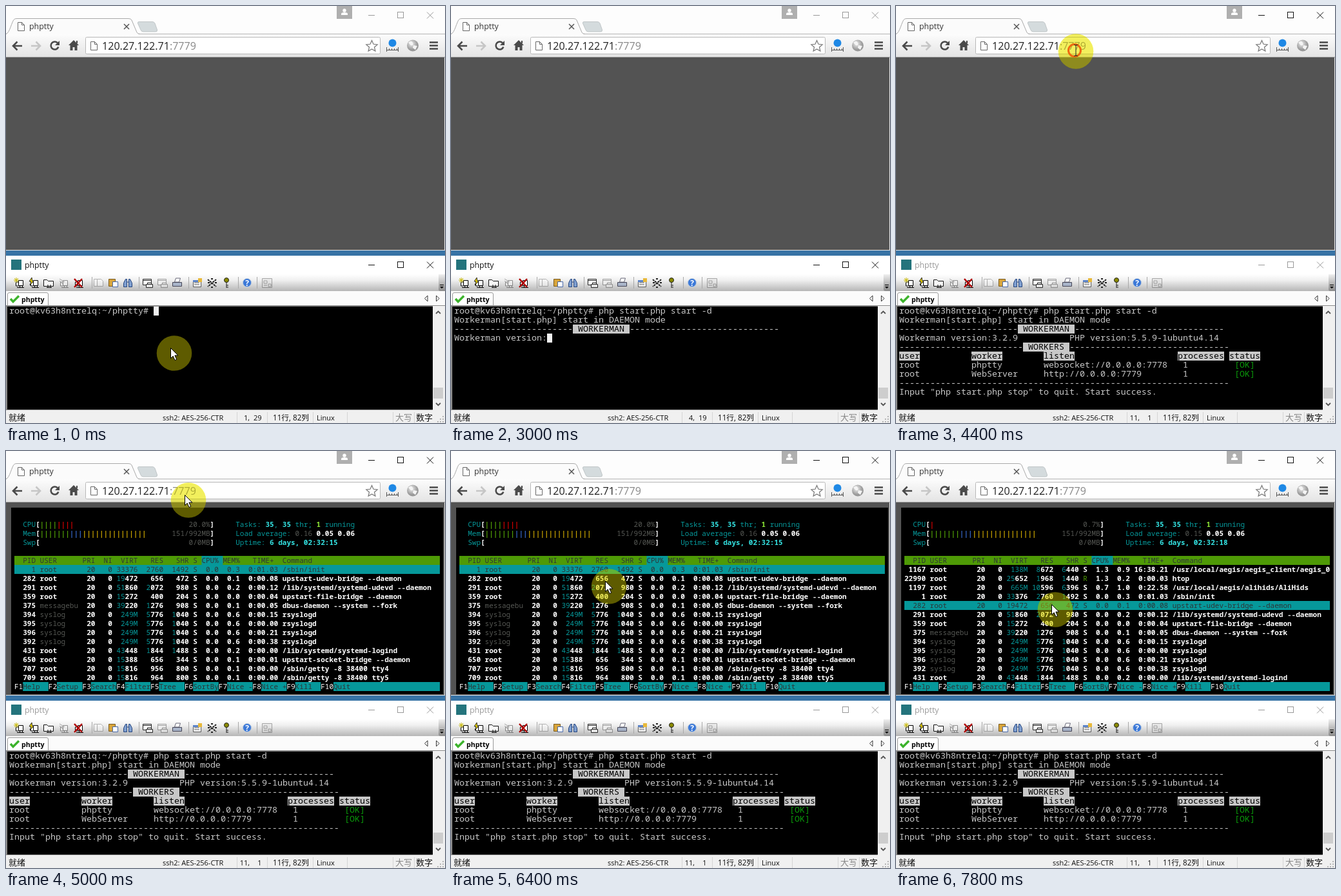
These frames come from a looping animation (681 by 648 pixels, 8 s). An HTML page:

```html
<!DOCTYPE html>
<html lang="zh">
<head>
<meta charset="utf-8">
<title>phptty</title>
<style>
html, body { margin: 0; width: 100%; height: 100%; overflow: hidden; background: #fff; }
svg { display: block; width: 681px; height: 648px; }
text { white-space: pre; font-family: "Open Sans", "Noto Sans CJK SC", "Noto Sans CJK", sans-serif; }
.mono text { font-family: "Noto Sans Mono", "DejaVu Sans Mono", monospace; }
#top text { font-size: 11px; }
#shell text { font-size: 13.333px; }
.line { fill: none; stroke: #555; }
.bar { font-size: 11px; fill: #111; }
.tint { mix-blend-mode: multiply; }
</style>
</head>
<body>
<svg viewBox="0 0 681 648" xmlns="http://www.w3.org/2000/svg">
  <defs>
    <linearGradient id="nav" x2="0" y2="1"><stop stop-color="#fcfcfc"/><stop offset="1" stop-color="#e4e4e4"/></linearGradient>
    <linearGradient id="tools" x2="0" y2="1"><stop stop-color="#fff"/><stop offset=".35" stop-color="#f0f0f0"/><stop offset="1" stop-color="#b6b6b6"/></linearGradient>
    <linearGradient id="grip" x2="0" y2="1"><stop stop-color="#eee"/><stop offset="1" stop-color="#8a8a8a"/></linearGradient>
    <radialGradient id="ball" cx=".4" cy=".35"><stop stop-color="#eee"/><stop offset="1" stop-color="#999"/></radialGradient>
    <path id="sheet" d="M.5.5h6l4 4v9h-10zM6.5.5v4h4" fill="#fff" stroke="#666"/>
    <g id="controls" fill="none" stroke="currentColor">
      <path d="M0 5.500h10M91 .5l10 10M101 .5l-10 10"/><rect x="45.500" y=".5" width="9" height="9"/>
    </g>
  </defs>

  <!-- browser window -->
  <rect width="681" height="80" fill="#fdfdfd"/>
  <rect y="44" width="681" height="35" fill="url(#nav)"/>
  <path d="M0 43.500H681" stroke="#b4b4b4"/>
  <path d="M0 44C6 42 9 23 13 20.500Q14 19.500 17 19.500H190Q194 19.500 195 22L203 41Q204 43.500 208 44Z" fill="#fbfbfb"/>
  <path d="M0 43.500C6 42 9 23 13 20.500Q14 19.500 17 19.500H190Q194 19.500 195 22L203 41Q204 43.500 208 43.500" fill="none" stroke="#aaa"/>
  <path d="M206 24.500H227Q230 24.500 231 27L234.500 37Q235 40 232 40H213Q210 40 209 37L204.500 27Q204 24.500 206 24.500Z" fill="#d4dbdd" stroke="#c0c6c8"/>
  <rect x="513" width="24" height="20" fill="#afafaf"/>
  <path d="M520 14v-2q0-2 5-2t5 2v2z" fill="#fff"/><circle cx="525" cy="7" r="2.700" fill="#fff"/>
  <use href="#sheet" x="18" y="25"/>
  <text x="36" y="36" font-size="12.400" fill="#333">phptty</text>
  <path d="M183 28l8 8M191 28l-8 8" stroke="#555" stroke-width="1.500"/>
  <g fill="none" stroke="#4a4a4a" stroke-width="2.600">
    <path d="M25 62H12M17.500 55.500L11 62l6.500 6.500"/>
    <path d="M39 62H52M46.500 55.500L53 62l-6.500 6.500" stroke="#c6c6c6"/>
    <path d="M80.500 58a6 6 0 1 0 .8 5.500"/>
    <path d="M657 56.500h13M657 61.500h13M657 66.500h13"/>
  </g>
  <path d="M83 54v7h-7z" fill="#4a4a4a"/>
  <path d="M105 53l8 8h-2.500v8h-4v-5h-3v5h-4v-8H97zM109 54h2v4h-2z" fill="#4a4a4a"/>
  <rect x="123.500" y="48.500" width="457" height="26" rx="2" fill="#fff" stroke="#b8b8b8"/>
  <use href="#sheet" x="131" y="55"/>
  <text x="149" y="68" font-size="16.100" fill="#222">120.27.122.71<tspan fill="#888">:7779</tspan></text>
  <path d="M567.500 53.500l2.500 5.800 6.200.6-4.700 4.100 1.400 6.100-5.400-3.200-5.400 3.200 1.400-6.100-4.700-4.100 6.200-.6z" fill="#fff" stroke="#777" stroke-width="1.200"/>
  <circle cx="599.500" cy="57.500" r="6" fill="#1e88e5"/>
  <path d="M590.500 64v7M608.500 64v7M590 68.500h19M594.500 66v3M598.500 66v3M602.500 66v3M606.500 66v3" class="line"/>
  <circle cx="631" cy="61.500" r="9" fill="url(#ball)"/>
  <path d="M624 57q5-5 7 0t-3 4zM632 61l6 1-3 6-4-3z" fill="#f4f4f4"/>
  <path d="M0 79.500H681" stroke="#9a9a9a"/>
  <rect y="80" width="680" height="299" fill="#535353"/>
  <rect x="680" y="80" width="1" height="299" fill="#e8e8e8"/>
  <g id="top" class="mono"></g>
  <rect y="379" width="681" height="1" fill="#e8e8e8"/>
  <rect y="380" width="681" height="8" fill="#3773a5"/>
  <use id="ctlA" href="#controls" x="562" y="9"/>

  <!-- terminal window -->
  <rect y="388" width="681" height="29" fill="#fff"/>
  <rect x="8" y="394" width="16" height="16" fill="#24747c"/>
  <text id="title" x="29" y="407" font-size="12.300">phptty</text>
  <use id="ctlB" href="#controls" x="562" y="397"/>
  <rect y="417" width="681" height="26" fill="url(#tools)"/>
  <g id="icons"></g>
  <path d="M671 417h10v26h-7q-3 0-3-3z" fill="url(#grip)"/>
  <path d="M673 433.500h6" stroke="#000"/><path d="M673 436h6l-3 3z"/>
  <rect y="443" width="681" height="23" fill="#fbfbfb"/>
  <path d="M2.500 466V448q0-2.500 2.500-2.500H63q2.500 0 2.500 2.500V466" fill="#fff" stroke="#999"/>
  <path d="M7 455l4 4.500 9-9" fill="none" stroke="#3cb32c" stroke-width="3.500"/>
  <text x="24" y="459.500" font-size="10.600" font-weight="bold">phptty</text>
  <path d="M654 450v9l-4.500-4.500zM667.500 450v9l4.500-4.500z" fill="#fff" stroke="#333"/>
  <rect y="465" width="681" height="164" fill="#8a8a8a"/>
  <rect x="2" y="467" width="660" height="160" fill="#000"/>
  <rect x="662" y="466" width="19" height="162" fill="#f0f0f0"/>
  <rect x="663" y="593" width="15" height="17" fill="#cdcdcd"/>
  <path d="M667 478l3.500-3.500 3.500 3.500M667 617l3.500 3.500 3.500-3.500" class="line" stroke-width="1.800"/>
  <g id="shell" class="mono"></g>
  <rect y="628" width="681" height="20" fill="#f0f0f0"/>
  <path d="M358.500 631v17M405.500 631v17M476.500 631v17M529.500 631v17M600.500 631v17M633.500 631v17" stroke="#d5d5d5"/>
  <g class="bar">
    <text x="4" y="644" font-size="13">就绪</text>
    <text x="243" y="644">ssh2: AES-256-CTR</text>
    <text id="row" x="378" y="644" text-anchor="end"></text>
    <text id="col" x="396.500" y="644" text-anchor="end"></text>
    <text x="414" y="644" font-size="11.700">11行, 82列</text>
    <text x="482" y="644">Linux</text>
    <text x="604" y="644" font-size="13" fill="#888">大写</text>
    <text x="636" y="644" font-size="13">数字</text>
  </g>
  <path d="M677 637h2v2h-2zM677 641h2v2h-2zM677 645h2v2h-2zM673 641h2v2h-2zM673 645h2v2h-2zM669 645h2v2h-2z" fill="#b5b5b5"/>
  <g id="mouse"></g>
</svg>
<script>
const STEP = 200, LOOP = 8000;
const $ = id => document.getElementById(id);
const rect = (x, y, w, h, fill) => `<rect x="${x}" y="${y}" width="${w}" height="${h}" fill="${fill}"/>`;
const path = (d, fill = "none", stroke = "#333") => `<path d="${d}" fill="${fill}" stroke="${stroke}"/>`;

// Character grid: returns a writer for text at (column, row)
const grid = (x0, y0, cw) => (c, r, s, fill, bg, weight = 400) => {
  const x = x0 + c * cw, y = y0 + r * 14;
  return (bg ? rect(x, y, s.length * cw, 14, bg) : "") +
    `<text x="${x}" y="${y + 11}" fill="${fill}" font-weight="${weight}">${s}</text>`;
};

/* ---- toolbar icons ---- */
const at = (x, body) => `<g transform="translate(${x} 422)">${body}</g>`;
const plug = path("M7.500 4.500h7v8h-7zM9.500 12v3M13.500 12v3M5 15.500h11M7.500 7h-4v6h4", "#fff", "#000");
const folder = path("M.5 3.500h5l2 2h8v8H.5z", "#f6f6f6", "#111") + path("M7 11v4M11 11v4M5 15.500h8", "none", "#111");
const win = path("M.5 2.500h13v9H.5zM.5 4.500h13", "#fff", "#222");
const printer = path("M7.500 11v-3h6v3M5.500 10.500h10v5h-10z", "#e8e8e8", "#222");
const faint = s => `<g opacity=".4">${s}</g>`;
const page = x => path(`M${x} 2.500h6l3 3v8h-9z`, "#fff", "#555");
$("icons").innerHTML = [133, 206, 283, 360, 389].map(x => path(`M${x}.5 421v18`, "none", "#a8a8a8")).join("") + [
  [12, plug + path("M4 0v8M0 4h8M1 1l6 6M7 1l-6 6", "none", "#c8b800")],
  [35, plug + path("M5 0L1 6h3L2 12l6-7H5.500z", "#ffe600", "#222")],
  [58, folder],
  [81, faint(plug + path("M2 2l8 5M2 5l5 5", "none", "#333"))],
  [104, plug + `<path d="M2 2l12 13M14 2L2 15" stroke="#b00000" stroke-width="2.500"/>`],
  [135, faint(page("1.500") + page("6.500"))],
  [158, path("M1.500 2.500h10v11h-10z", "#d8a53c", "#7a5a1c") + path("M7.500 6.500h8v8h-8z", "#fff", "#4868a8")],
  [181, path("M1.500 14.500v-6l3-6h2v12zM9.500 14.500v-12h2l3 6v6zM6 7h4", "#7f9fd0", "#26457c")],
  [212, win + printer], [235, faint(win + printer)],
  [258, path("M3.500 7l2-6h7l-2 6z", "#fff", "#667") + path("M.5 7.500h14v6H.5z", "#a9b5c9", "#445")],
  [289, path("M1.500 4.500h12v10h-12zM3 8h8M3 11h8", "#fff", "#555") + rect(1, 4, 12, 3, "#5a82c8") + rect(9, 1, 6, 6, "#e8b93a")],
  [312, `<path d="M1 3l13 11M14 3L1 14M1 8h3M6 2h4M12 8h3M6 15h4" stroke="#222" stroke-width="2" stroke-dasharray="3 1"/>`],
  [336, `<circle cx="6" cy="4" r="3.500" fill="#8a8a00" stroke="#222"/>` + path("M6 7v9M6 12h3M6 15h3", "none", "#222")],
  [366, `<circle cx="8" cy="8" r="6.500" fill="#3b78d8" stroke="#bcd"/><text x="5.200" y="12.500" font-size="12" font-weight="bold" fill="#fff">?</text>`],
  [397, faint(path("M.5 1.500h15v14H.5zM3 12h5M3 5h5v4H3zM10 10h4v4h-4z", "#ddd", "#333"))]
].map(([x, body]) => at(x, body)).join("");

/* ---- lower shell ---- */
const put = grid(5, 467, 8), FG = "#c8c8c8", OK = "#0a9a0a";
const PROMPT = "root@kv63h8ntrelq:~/phptty# ", CMD = "php start.php start -d";
// [time, typed characters]
const TYPED = [[0, 0], [600, 1], [800, 2], [1000, 3], [1200, 4], [1400, 5], [1600, 6], [1800, 14],
  [2000, 15], [2200, 17], [2400, 18], [2600, 20], [2800, 21], [3000, 22]];
const dash = n => "-".repeat(n);
const block = (c, r) => rect(5 + c * 8, 467 + r * 14, 8, 14, "#f0f0f0");
const banner = (r, n, name, m) => put(0, r, dash(n), FG) + put(n, r, name, "#000", FG) + put(n + name.length, r, dash(m), FG);
const worker = (r, name, url) => put(0, r, "root", FG) + put(14, r, name, FG) + put(28, r, url, FG) +
  put(55, r, "1", FG) + put(65, r, "[OK]", OK);

function shell(t) {
  const n = TYPED.filter(p => p[0] <= t).pop()[1];
  let out = put(0, 0, PROMPT + CMD.slice(0, n), FG), row = 1, col = 29 + n;
  if (t < 3000) out += block(28 + n, 0);
  else {
    out += put(0, 1, "Workerman[start.php] start in DAEMON mode", FG) + banner(2, 23, " WORKERMAN ", 29);
    out += put(0, 3, "Workerman version:", FG);
    if (t < 3200) { out += block(18, 3); row = 4; col = 19; }
    else {
      out += put(18, 3, "3.2.9", FG) + put(33, 3, "PHP version:5.5.9-1ubuntu4.14", FG) + banner(4, 24, " WORKERS ", 31);
      for (const [c, s] of [[0, "user"], [14, "worker"], [28, "listen"], [54, "processes"], [64, "status"]])
        out += put(c, 5, s, "#000", FG);
      out += worker(6, "phptty", "websocket://0.0.0.0:7778") + worker(7, "WebServer", "http://0.0.0.0:7779");
      out += put(0, 8, dash(64), FG) + put(0, 9, 'Input "php start.php stop" to quit. Start success.', FG);
      if (t < 4400) out += block(0, 10);
      row = 11; col = 1;
    }
  }
  $("shell").innerHTML = out;
  $("row").textContent = row + ",";
  $("col").textContent = col;
}

/* ---- process viewer ---- */
const cell = grid(13, 93, 6.6);
const CYAN = "#06989a", GREEN = "#4e9a06", RED = "#cc0000", DARK = "#2e3436", GREY = "#555753", WHITE = "#fff";
// pid user virt res shr state cpu mem time command
const BASE = `1 root 33376 2760 1492 S 0.0 0.3 0:01.03 /sbin/init
282 root 19472 656 472 S 0.0 0.1 0:00.08 upstart-udev-bridge --daemon
291 root 51860 2072 980 S 0.0 0.2 0:00.12 /lib/systemd/systemd-udevd --daemon
359 root 15272 400 204 S 0.0 0.0 0:00.04 upstart-file-bridge --daemon
375 messagebu 39220 1276 908 S 0.0 0.1 0:00.05 dbus-daemon --system --fork
394 syslog 249M 5776 1040 S 0.0 0.6 0:00.15 rsyslogd
395 syslog 249M 5776 1040 S 0.0 0.6 0:00.00 rsyslogd
396 syslog 249M 5776 1040 S 0.0 0.6 0:00.21 rsyslogd
392 syslog 249M 5776 1040 S 0.0 0.6 0:00.38 rsyslogd
431 root 43448 1844 1488 S 0.0 0.2 0:00.00 /lib/systemd/systemd-logind
650 root 15388 656 344 S 0.0 0.1 0:00.01 upstart-socket-bridge --daemon
707 root 15816 956 800 S 0.0 0.1 0:00.00 /sbin/getty -8 38400 tty4
709 root 15816 964 800 S 0.0 0.1 0:00.00 /sbin/getty -8 38400 tty5`.split("\n");
const BUSY = `1167 root 138M 8672 6440 S 1.3 0.9 16:38.21 /usr/local/aegis/aegis_client/aegis_0
22990 root 25652 1968 1440 R 1.3 0.2 0:00.03 htop
1197 root 665M 10596 6396 S 0.7 1.0 0:22.58 /usr/local/aegis/alihids/AliHids`.split("\n");
const KEYS = ["Help  ", "Setup ", "Search", "Filter", "Tree  ", "SortBy", "Nice -", "Nice +", "Kill  "];

function proc(line, i, selected) {
  const r = 6 + i, [pid, user, virt, res, shr, state, cpu, mem, time, ...cmd] = line.split(" ");
  const w = (c, s, col = WHITE) =>
    s ? cell(c, r, s, selected ? DARK : col, "", !selected && col === WHITE ? 600 : 400) : "";
  const right = (end, s) => w(end - s.length, s);
  const size = (end, s) => {
    const cut = s.endsWith("M") ? s.length : Math.max(0, s.length - 3);
    return w(end - s.length, s.slice(0, cut), CYAN) + w(end - s.length + cut, s.slice(cut));
  };
  return (selected ? rect(13, 93 + r * 14, 660, 14, CYAN) : "") + right(5, pid) +
    w(6, user, user === "root" ? WHITE : GREY) + w(17, "20") + w(22, "0") +
    size(29, virt) + size(35, res) + size(41, shr) + w(42, state, state === "R" ? GREEN : WHITE) +
    right(48, cpu) + right(53, mem) + right(62, time) + w(63, cmd.join(" "));
}

function meter(r, name, bars, label) {
  let c = 6, out = cell(2, r, name, CYAN) + cell(5, r, "[", WHITE, "", 700);
  for (const [n, col] of bars) { out += cell(c, r, "|".repeat(n), col, "", 600); c += n; }
  return out + cell(46 - label.length, r, label, GREY) + cell(46, r, "]", WHITE, "", 700);
}

function viewer(t) {
  if (t < 5000) { $("top").innerHTML = ""; return; }
  const fresh = t >= 6600, picked = t >= 7600 ? 4 : 0;
  const secs = fresh ? (t >= 7600 ? 18 : 17) : 15;
  const rows = fresh ? BUSY.concat(BASE).slice(0, 13) : BASE;
  const bold = (c, r, s, col = WHITE) => cell(c, r, s, col, "", 700);
  let out = rect(8, 88, 670, 290, "#000");
  out += meter(1, "CPU", fresh ? [[1, RED]] : [[4, GREEN], [4, RED]], fresh ? "0.7%" : "20.0%");
  out += meter(2, "Mem", [[7, GREEN], [3, "#3465c4"], [15, "#c4a000"]], "151/992MB");
  out += meter(3, "Swp", [], "0/0MB");
  out += cell(52, 1, "Tasks: ", CYAN) + bold(59, 1, "35", "#34e2e2") + cell(61, 1, ",", CYAN) + bold(63, 1, "35", "#34e2e2") +
    cell(66, 1, "thr;", CYAN) + bold(71, 1, "1", "#8ae234") + cell(73, 1, "running", CYAN);
  out += cell(52, 2, "Load average:", CYAN) + cell(66, 2, fresh ? "0.15" : "0.16", GREY) + bold(71, 2, "0.05 0.06");
  out += cell(52, 3, "Uptime:", CYAN) + bold(60, 3, "6 days, 02:32:" + secs, "#34e2e2");
  out += rect(13, 163, 660, 14, GREEN) + rect(303.4, 163, 33, 14, CYAN) +
    cell(0, 5, "  PID USER      PRI  NI  VIRT   RES   SHR S CPU% MEM%   TIME+  Command", DARK);
  rows.forEach((line, i) => out += proc(line, i, i === picked));
  KEYS.forEach((s, i) => out += cell(i * 8, 19, "F" + (i + 1), WHITE) + cell(i * 8 + 2, 19, s, DARK, CYAN));
  out += cell(72, 19, "F10", WHITE) + cell(75, 19, "Quit".padEnd(25), DARK, CYAN);
  $("top").innerHTML = out;
}

/* ---- pointer: [time, x, y] of the tip ---- */
const TRACK = [[0, 255, 531], [3600, 255, 531], [3800, 257, 510], [4200, 272, 90], [4400, 273, 62], [4800, 273, 62],
  [5000, 277, 68], [5800, 275, 78], [6000, 255, 114], [6200, 243, 170], [6400, 239, 202], [7200, 239, 206],
  [7600, 241, 236], [7800, 241, 238], [LOOP, 241, 238]];

function mouse(t) {
  let out = "";
  if (t < 600 || t >= 3800) {
    const i = TRACK.findIndex(p => p[0] > t), [ta, xa, ya] = TRACK[i - 1], [tb, xb, yb] = TRACK[i];
    const k = (t - ta) / (tb - ta), x = xa + (xb - xa) * k, y = ya + (yb - ya) * k;
    const halo = `<circle cx="${x + 6}" cy="${y + 8.5}" r="27.300"`;
    out = halo + ` fill="#e0d800" opacity=".42"/>` + halo + ` fill="#ffffa0" class="tint"/>`;
    out += `<g transform="translate(${x} ${y})">`;
    if (t === 4400) out += `<circle cx="4" cy="7" r="9.500" fill="none" stroke="#f06a10" stroke-width="3"/>`;
    out += t >= 4400 && t < 5000
      ? path("M3 -1.500h2.500l.5 1 .5-1H9M6 -1V15M3 15.500h2.500l.5-1 .5 1H9", "none", "#222")
      : path("M.5.5V16.500l3.700-3.500 2.800 6.500 2.700-1.200-2.800-6.300h5z", "#fff", "#000");
    out += "</g>";
  }
  $("mouse").innerHTML = out;
}

let last = -1;
const start = performance.now();
function tick(now) {
  const t = Math.floor((Math.max(0, now - start) % LOOP) / STEP) * STEP;
  if (t !== last) {
    last = t;
    const web = t >= 4400;
    $("ctlA").style.color = web ? "#111" : "#999";
    $("ctlB").style.color = web ? "#999" : "#111";
    $("title").style.fill = web ? "#999" : "#111";
    shell(t);
    viewer(t);
    mouse(t);
  }
  requestAnimationFrame(tick);
}
tick(start);
</script>
</body>
</html>
```
